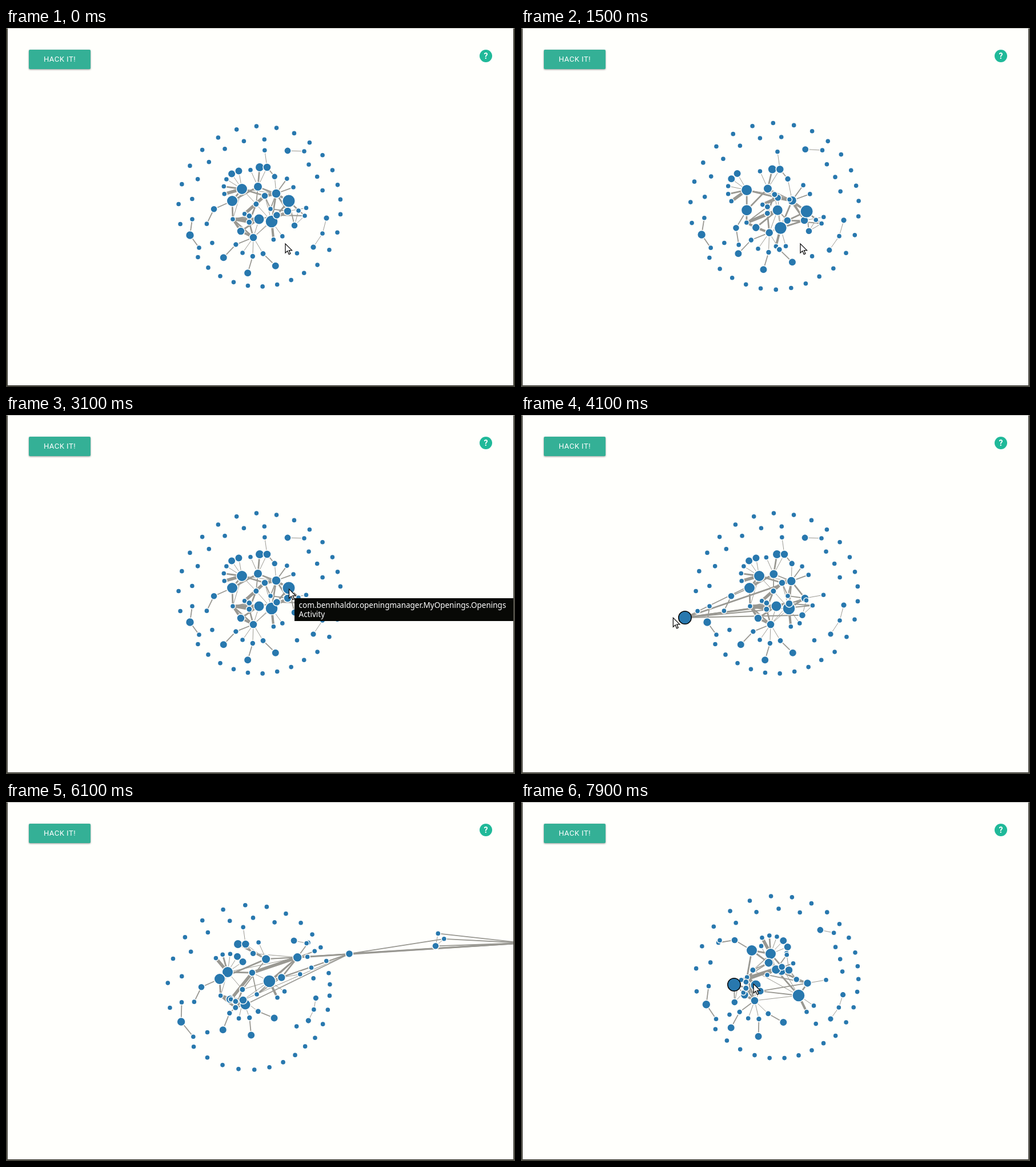
Recreate the animation shown at these times as an HTML page with a canvas. Size 891 by 629 pixels, loop 8000 ms.

```html
<!DOCTYPE html>
<html lang="en">
<head>
<meta charset="utf-8">
<title>Dependency graph</title>
<style>
html, body { margin: 0; width: 100%; height: 100%; overflow: hidden; background: #fffffc; }
body { position: relative; }
canvas, #frame, #btn, #help, #tip, #cursor { position: absolute; }
canvas { left: 0; top: 0; }
#frame { inset: 0; box-sizing: border-box; border: 3px solid #4e4d45; border-top: 1px solid #b9b9b4; }
#btn { left: 40px; top: 38px; width: 108px; height: 34px; border-radius: 2px; background: #34b096;
  color: #fff; font: 13px/34px Roboto, sans-serif; letter-spacing: .5px; text-align: center;
  box-shadow: 0 1px 3px rgba(0,0,0,.4); }
#help { left: 829px; top: 38px; width: 22px; height: 22px; border-radius: 50%; background: #20b999;
  color: #fff; font: bold 14px/23px Roboto, sans-serif; text-align: center; }
#tip { left: 505px; top: 321px; width: 383px; height: 40px; box-sizing: border-box; padding: 4px 0 0 7.5px;
  background: #080906; color: #fff; font: 13.5px/16px "Noto Sans", sans-serif; white-space: nowrap; }
#cursor { left: 0; top: 0; }
</style>
</head>
<body>
<canvas id="stage" width="891" height="629"></canvas>
<div id="btn">HACK IT!</div>
<div id="help">?</div>
<div id="tip">com.bennhaldor.openingmanager.MyOpenings.Openings<br>Activity</div>
<div id="frame"></div>
<svg id="cursor" width="18" height="24" viewBox="-2 -2 18 24">
  <path d="M0 0V16L3.8 12.6L6.3 18.6L8.9 17.5L6.4 11.6H11.5Z" fill="#fff" stroke="#111" stroke-width="1.3"/>
</svg>
<script>
const LOOP = 8000, STEP = 100, GRAB = 3900, CX = 444, CY = 314, DOT = 3.8;
const BLUE = '#2878ae', GREY = '#999892', PAPER = '#fffffc';
const el = id => document.getElementById(id);
const g = el('stage').getContext('2d');
const mix = (a, b, k) => a + (b - a) * k;
const clamp = x => Math.max(0, Math.min(1, x));
const polar = (x, y, r, deg) => {
  const a = deg * Math.PI / 180;
  return [x + r * Math.cos(a), y + r * Math.sin(a)];
};

// Hubs at rest: x, y, radius
const hubs = {
  A: [413, 282, 9], B: [396, 303, 9], C: [441, 278, 7], H: [444, 244, 7], I: [457, 244, 6.3],
  J: [473, 290, 7.3], K: [453, 294, 5.3], M: [443, 335, 8.5], N: [465, 339, 10.3], O: [474, 328, 5.8],
  Q: [493, 321, 6.2], R: [433, 367, 6.3], S: [411, 356, 6.3], T: [397, 335, DOT],
  X: [505, 346, 5.3], Y: [512, 320, DOT], Z: [523, 329, DOT], D: [495, 303, 10.5]
};

// Leaves fan out from a hub: distance, first angle, angle step, radii
const fans = [
  { hub: 'A', id: 'a', dist: 32, from: 164, step: 24, radii: [DOT, DOT, DOT, 6, 6] },
  { hub: 'B', id: 'b', dist: 35, from: 156, step: 0, radii: [5.3] },
  { hub: 'B', id: 'bb', dist: 60, from: 138, step: 0, radii: [DOT] },
  { hub: 'C', id: 'c', dist: 32, from: 246, step: 0, radii: [DOT] },
  { hub: 'I', id: 'i', dist: 30, from: 262, step: 0, radii: [DOT] },
  { hub: 'I', id: 'ii', dist: 21, from: 51, step: 0, radii: [4.7] },
  { hub: 'J', id: 'j', dist: 32, from: 306, step: 34, radii: [DOT, DOT] },
  { hub: 'M', id: 'm', dist: 27, from: 200, step: 59, radii: [DOT, 4.5, DOT] },
  { hub: 'M', id: 'mm', dist: 18, from: 163, step: 35, radii: [4.5, 4.4] },
  { hub: 'N', id: 'n', dist: 32, from: 84, step: -30, radii: [DOT, DOT] },
  { hub: 'Q', id: 'q', dist: 33, from: 350, step: 0, radii: [DOT] },
  { hub: 'R', id: 'r', dist: 33, from: 158, step: -33, radii: [4.2, DOT, 4.2, 4.4] },
  { hub: 'R', id: 'rr', dist: 63, from: 146, step: -47, radii: [6, 6, 6] }
];

// Small components that drift with the ring
const islands = {
  d0: [493, 215, 5.4], d1: [522, 216, DOT], e0: [322, 363, 6.7], e1: [326, 335, DOT], e2: [338, 385, DOT],
  f0: [561, 333, 4.6], f1: [554, 360, DOT], f2: [538, 384, 4.6]
};

// Lone dots sit evenly on arcs: radius, first angle, last angle, count
const singles = [
  [142, 168, 282, 9], [143, 295, 333, 4], [142, 344, 365, 3], [143, 18, 45, 3], [139, 56, 141, 9],
  [119, 187, 274, 6], [114, 319, 345, 3], [104, 51, 143, 2]
].flatMap(([r, from, to, n]) =>
  Array.from({ length: n }, (_, i) => polar(CX, CY, r, mix(from, to, i / (n - 1)))));

// Links by weight
const links = Object.entries({
  1: 'A-a2 A-a3 A-a4 A-m1 A-J A-T C-c0 C-I I-i0 J-ii0 K-N M-R N-n1 N-m1 R-N R-r1 R-r2 R-r3 R-O Q-q0 X-Y X-Z d0-d1 f0-f1 f1-f2',
  1.8: 'B-b0 b0-bb0 C-m1 C-J I-ii0 J-j0 J-j1 J-m2 K-m2 T-mm1 M-O N-O m2-Q O-Q O-Z D-X D-Y D-Z D-C R-r0 r0-rr0 r2-rr1 r3-rr2 e0-e1 e0-e2',
  2.8: 'A-a1 A-B A-K B-T B-C C-H J-D J-Q J-N O-D T-R M-S M-mm0 N-Q R-mm0 m1-mm0',
  4: 'N-n0 T-S R-S T-mm0',
  5.5: 'A-a0 J-K K-m0 T-M'
}).flatMap(([w, s]) => s.split(' ').map(e => [...e.split('-'), +w]));

// Key points of the drag: time, x, y
const drag = [
  [GRAB, 495, 305], [4100, 287, 355], [4500, 125, 315], [4800, 82, 205], [5100, 153, 98], [5350, 330, 54],
  [5700, 798, 84], [6100, 906, 247], [6600, 613, 518], [7000, 260, 475], [7350, 123, 390], [7500, 136, 330],
  [7900, 373, 320], [8000, 490, 316]
];
function dragAt(t) {
  const last = drag.length - 1;
  let i = 0;
  while (i < last - 1 && drag[i + 1][0] <= t) i++;
  const a = drag[i], b = drag[i + 1], span = b[0] - a[0], k = clamp((t - a[0]) / span);
  const slope = (j, c) => {
    const p = drag[Math.max(0, j - 1)], q = drag[Math.min(last, j + 1)];
    return j === 0 ? 0 : (q[c] - p[c]) / (q[0] - p[0]);
  };
  return [1, 2].map(c => {
    const k2 = k * k, k3 = k2 * k;
    return (2 * k3 - 3 * k2 + 1) * a[c] + (3 * k2 - 2 * k3) * b[c]
      + span * ((k3 - 2 * k2 + k) * slope(i, c) + (k3 - k2) * slope(i + 1, c));
  });
}

// Share of the drag that tied hubs follow, a little late
const pull = { X: .62, Y: .62, Z: .62, O: .32, J: .14, C: .1 }, LAG = 150;

// Poses: ring is shift x, shift y, squeeze, spin; turn rotates fans; keys place a few hubs
const rest = t => ({ t, ring: [0, 0, 0, 0], turn: {}, keys: {} });
const poses = [
  rest(0), rest(800),
  { t: 1500, ring: [0, 0, 0, 3], turn: { A: -20, B: -35, N: 20 },
    keys: { A: [397, 285], B: [397, 319], H: [440, 250], M: [449, 319], N: [454, 349], R: [435, 357], D: [498, 321] } },
  rest(2800), rest(GRAB),
  { t: 4100, ring: [4, 0, 0, 0], turn: {}, keys: { M: [447, 335] } },
  { t: 5100, ring: [25, 3, 12, 0], turn: { A: 78, R: -40, N: -42 },
    keys: { A: [423, 292], B: [392, 323], H: [407, 279], M: [464, 348], N: [477, 324], R: [436, 367] } },
  { t: 6100, ring: [-2, 13, 17, 3], turn: { A: 66, R: -22, N: -20 },
    keys: { A: [388, 298], B: [374, 310], H: [406, 249], M: [419, 355], N: [461, 314], R: [415, 347] } },
  { t: 7900, ring: [14, -4, 10, 12], turn: { A: 78, B: 55, R: -15, N: -20 },
    keys: { A: [437, 266], B: [404, 260], H: [456, 296], M: [411, 321], N: [486, 339], R: [409, 348] } }
];

// Shift of a hub: key hubs weighted by nearness
function shift({ keys }, [x, y]) {
  let sx = 0, sy = 0, sum = 1e-9;
  for (const n in keys) {
    const [hx, hy] = hubs[n], w = 1 / (1e-3 + Math.hypot(x - hx, y - hy) ** 3);
    sx += w * (keys[n][0] - hx);
    sy += w * (keys[n][1] - hy);
    sum += w;
  }
  return [sx / sum, sy / sum];
}

function layout(t) {
  let i = 0;
  while (i < poses.length - 2 && poses[i + 1].t <= t) i++;
  const a = poses[i], b = poses[i + 1], at = {};
  let k = clamp((t - a.t) / (b.t - a.t));
  if (t < 2800) k = 1 - (1 - k) ** 2;

  const late = dragAt(t - LAG), tug = [late[0] - drag[0][1], late[1] - drag[0][2]];
  for (const n in hubs) {
    const p = shift(a, hubs[n]), q = shift(b, hubs[n]), f = pull[n] || 0;
    const [x, y] = [0, 1].map(c => hubs[n][c] + mix(p[c], q[c], k) + f * tug[c]);
    at[n] = [x, y, hubs[n][2]];
  }
  if (t >= GRAB) at.D = [...dragAt(t), hubs.D[2]];

  for (const { hub, id, dist, from, step, radii } of fans) {
    const turn = mix(a.turn[hub] || 0, b.turn[hub] || 0, k);
    radii.forEach((r, j) => { at[id + j] = [...polar(at[hub][0], at[hub][1], dist, from + j * step + turn), r]; });
  }

  const [sx, sy, squeeze, spin] = a.ring.map((v, j) => mix(v, b.ring[j], k));
  const drift = (x, y, r) => {
    const u = Math.atan2(y - CY, x - CX);
    return [
      x + sx - squeeze * Math.cos(2 * u) - spin * Math.sin(u),
      y + sy - squeeze * Math.sin(2 * u) + spin * Math.cos(u), r];
  };
  for (const n in islands) at[n] = drift(...islands[n]);
  singles.forEach(([x, y], j) => { at['o' + j] = drift(x, y, DOT); });

  // Brief swell when the layout reheats
  const swell = 1 + .06 * Math.sin(Math.PI * clamp((t - 800) / 900));
  for (const p of Object.values(at)) {
    p[0] = CX + (p[0] - CX) * swell;
    p[1] = CY + (p[1] - CY) * swell;
  }
  return at;
}

function disc([x, y, r], edge) {
  g.beginPath();
  g.arc(x, y, r + .75, 0, 2 * Math.PI);
  g.fillStyle = BLUE;
  g.strokeStyle = edge;
  g.lineWidth = 1.5;
  g.fill();
  g.stroke();
}

function cursorAt(t) {
  if (t >= GRAB) return dragAt(t + 35);
  const k = clamp((t - 2600) / 300);
  return [mix(489, 495.5, k), mix(378, 305, k)];
}

function draw(t) {
  const at = layout(t);
  g.clearRect(0, 0, 891, 629);
  g.strokeStyle = GREY;
  for (const [a, b, w] of links) {
    g.lineWidth = w;
    g.beginPath();
    g.moveTo(at[a][0], at[a][1]);
    g.lineTo(at[b][0], at[b][1]);
    g.stroke();
  }
  for (const n in at) if (n !== 'D') disc(at[n], PAPER);
  disc(at.D, t > GRAB ? '#080808' : PAPER);

  const [x, y] = cursorAt(t);
  el('cursor').style.transform = `translate(${x - 2}px, ${y - 2}px)`;
  el('tip').style.display = t >= 3100 && t < GRAB ? 'block' : 'none';
  const edge = t < 200 ? '#403f37' : '#4e4d45';
  el('frame').style.borderColor = `#b9b9b4 ${edge} ${edge}`;
}

const start = performance.now();
function tick(now) {
  const t = Math.max(0, now - start) % LOOP;
  draw(Math.floor(t / STEP) * STEP);
  requestAnimationFrame(tick);
}
draw(0);
requestAnimationFrame(tick);
</script>
</body>
</html>
```
